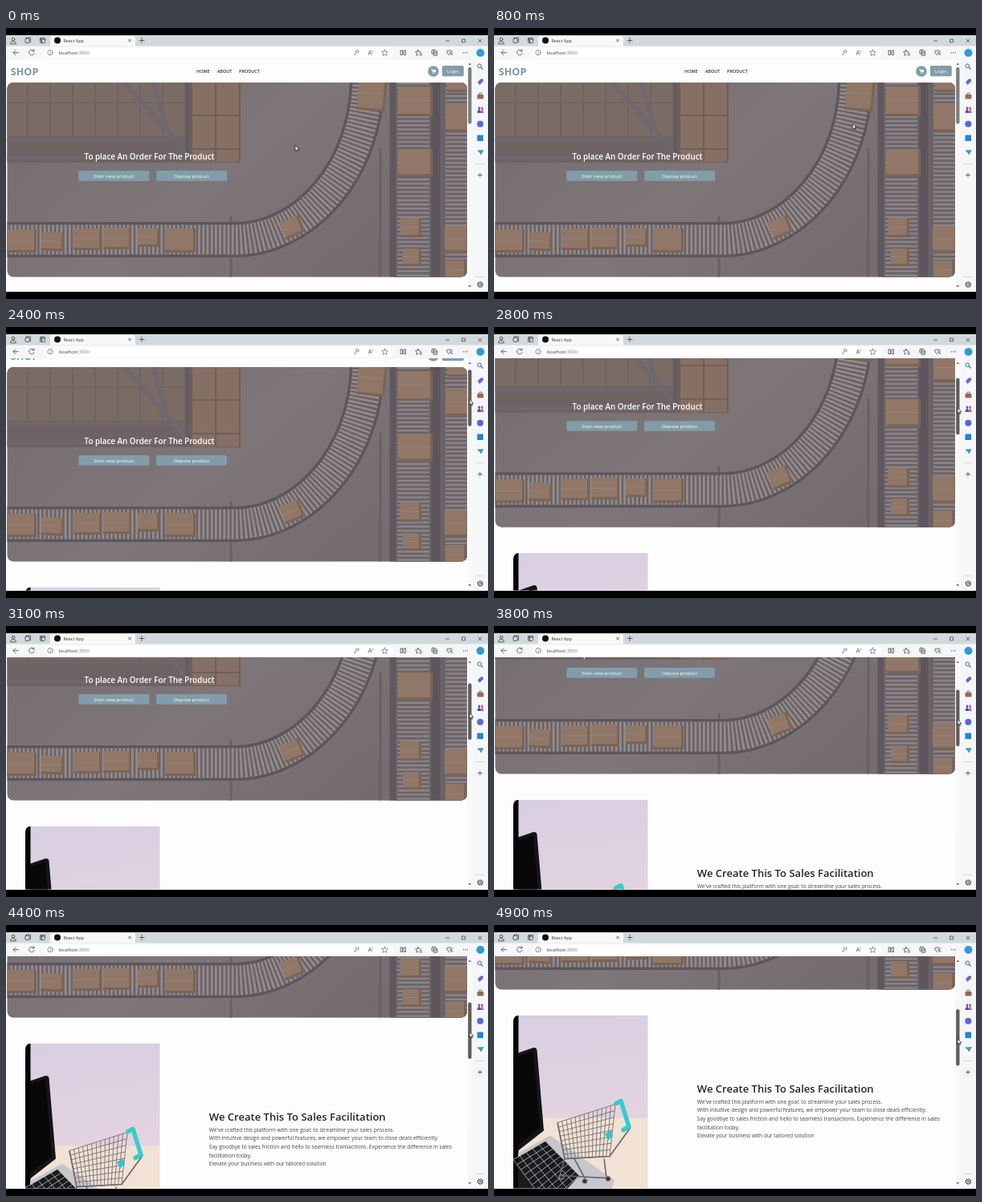
These frames come from a looping animation (600 by 338 pixels, 5 s). An HTML page:

```html
<!DOCTYPE html>
<html lang="en">
<head>
<meta charset="utf-8">
<title>React App</title>
<style>
  html, body { margin: 0; width: 100%; height: 100%; overflow: hidden; background: #000; }
  svg { display: block; width: 100vw; height: 100vh; }
  text { font-family: "Open Sans", "Noto Sans", sans-serif; }
  .semi { font-weight: 600; }
  .mid { text-anchor: middle; }
  .btn { font-size: 5.9px; fill: #fff; text-anchor: middle; }
  .nav { font-size: 5.5px; font-weight: 600; fill: #333; }
  .icon { fill: none; stroke: #444; stroke-width: .8; stroke-linecap: round; stroke-linejoin: round; }
</style>
</head>
<body>
<svg viewBox="0 0 600 338">
  <defs>
    <clipPath id="view"><rect y="39" width="580.5" height="289.5"/></clipPath>
    <clipPath id="heroClip"><rect x="1.5" y="68" width="572.5" height="242.5" rx="8"/></clipPath>
    <clipPath id="photoClip"><path d="M24 350V121q0-8 8-8H191.500V350z"/></clipPath>
    <linearGradient id="floor" x2="1" y2=".5">
      <stop stop-color="#706a6b"/><stop offset=".55" stop-color="#7d7777"/><stop offset="1" stop-color="#716a6c"/>
    </linearGradient>
    <linearGradient id="wall" x2=".2" y2="1">
      <stop stop-color="#d7cfe3"/><stop offset="1" stop-color="#e2d3de"/>
    </linearGradient>
  </defs>

  <!-- browser frame -->
  <rect y="9" width="600" height="320" fill="#f5f6f7"/>
  <rect y="9" width="600" height="13.500" fill="#d0d9dc"/>
  <path d="M55 22.500V13q0-3 3-3H158q3 0 3 3V22.500z" fill="#f8f8f8"/>
  <rect x="48" y="24.500" width="434" height="13" rx="6.500" fill="#fff"/>
  <circle cx="64" cy="15.500" r="4" fill="#111"/>
  <text x="71.500" y="17.700" font-size="5.400" fill="#333">React App</text>
  <text x="65.500" y="33" font-size="5.700" fill="#333">localhost<tspan fill="#777">:3000</tspan></text>
  <g class="icon">
    <circle cx="9" cy="14" r="1.800"/><path d="M5.500 19.500q0-3 3.500-3t3.500 3z"/>
    <rect x="24" y="13" width="5" height="5.500" rx="1"/><path d="M25.500 13v-1h5v5.500h-1"/>
    <rect x="42.500" y="12.500" width="6" height="6" rx="1"/><path d="M42.500 14h6M44.300 14v4.500" stroke-width="1.200"/>
    <path d="M152.500 14l3 3m0-3l-3 3M166 15.500h6M169 12.500v6"/>
    <path d="M547.500 16h4M568 14h3.500v3.800H568zM588 14l4 4m0-4l-4 4"/>
    <path d="M15.500 30.700h-6.500m3-3l-3 3 3 3M34.500 28.500a3.300 3.300 0 1 0 .6 3M35 27v2h-2"/>
    <g stroke="#777">
      <circle cx="55" cy="30.700" r="3.200"/><path d="M55 30.500v2M55 29v.1"/>
      <circle cx="437.300" cy="29.300" r="1.700"/><path d="M436 30.500l-2.500 2.800h1.800"/>
      <path d="M451 33.500l2-5.500 2 5.500M451.800 31.500h2.500M456 28q1 1.200 0 2.400"/>
      <path d="M471.500 27l1.100 2.500 2.700.3-2 1.900.6 2.700-2.400-1.400-2.400 1.400.6-2.700-2-1.900 2.700-.3z"/>
    </g>
    <path d="M491.500 28h2v5.500h-2zM495.500 28h2v5.500h-2z"/>
    <path d="M513 27.500l1 2.200 2.300.3M513 27.500l-1 2.200-2.300.3 1.700 1.700-.4 2.500 2-1.200M515 32h2.500M515 34h2.500"/>
    <rect x="530" y="27.500" width="5" height="5" rx="1"/><path d="M532 34.300h4.500V29M532.500 28.800v2.500m-1.200-1.200h2.500"/>
    <path d="M552 34l-3-3q-1-3 1.500-3.200l1.500 1.200 1.500-1.200q2.500.2 1.500 3.200M552 31h2v2h2"/>
    <path d="M569.300 30.800h.1M571.800 30.800h.1M574.300 30.800h.1" stroke-width="1.300"/>
  </g>

  <!-- side bar -->
  <circle cx="590.500" cy="31" r="5" fill="#2f9bd6"/>
  <circle cx="589.300" cy="47.300" r="2.400" fill="#d6ebff" stroke="#44659a" stroke-width=".9"/>
  <path d="M591.200 49.200l2.400 2.500" stroke="#44659a" stroke-width="1.200"/>
  <path d="M587 67.500l4-4h3v3l-4.500 4.500z" fill="#6b63d6"/>
  <path d="M589 83v-1.800h3V83" fill="none" stroke="#6d4c41" stroke-width=".8"/>
  <rect x="586.500" y="83" width="8" height="5.500" rx="1" fill="#96695a"/>
  <path d="M586.500 106q0-3 2-4l-1-2 1.500-2 1.500 2-1 2q2 1 2 4z" fill="#5b4bb0"/>
  <path d="M591 106l1-4-1-2 1.500-2 1.700 2-1 2 1.500 4z" fill="#b455a8"/>
  <circle cx="590.300" cy="119.800" r="4" fill="#5a67d8"/>
  <rect x="586.500" y="133.500" width="7.500" height="7.500" fill="#1f86d8"/>
  <path d="M586.300 152.500l8.500-.5-3.500 6.500-1.800-2.700z" fill="#3d9cc0"/>
  <path d="M584 169.500h12M584 310.500h12" stroke="#ccc" stroke-width=".7"/>
  <g class="icon">
    <path d="M587.500 183.500h5M590 181v5"/>
    <circle cx="590.300" cy="320" r="1.100"/><circle cx="590.300" cy="320" r="3" stroke-dasharray="2.200 .94" stroke-width="1.200"/>
  </g>

  <g clip-path="url(#view)">
    <rect y="39" width="580.500" height="290" fill="#fdfdfd"/>
    <g id="page">
      <text x="5.800" y="58.800" font-size="12.600" font-weight="700" fill="#7c97a2">SHOP</text>
      <text class="nav" x="237" y="56">HOME</text>
      <text class="nav" x="262.700" y="56">ABOUT</text>
      <text class="nav" x="290" y="56">PRODUCT</text>
      <circle cx="532" cy="54" r="6.800" fill="#829da9"/>
      <path d="M529 51.500h1.200l1 3.500h3l.7-2.500h-4" fill="#fff" stroke="#fff" stroke-width=".7"/>
      <path d="M531.500 56.700h.1M534 56.700h.1" stroke="#fff" stroke-linecap="round"/>
      <rect x="543" y="47" width="26.800" height="13.300" rx="2" fill="#829da9"/>
      <text class="btn" x="556.400" y="56">Login</text>

      <g clip-path="url(#heroClip)">
        <rect y="68" width="580" height="243" fill="url(#floor)"/>
        <path d="M0 68H232V168H0z" fill="#6a605d"/>
        <g id="shelf"></g>
        <g fill="none" stroke="#69666b">
          <path d="M0 139H228M0 162H232" stroke-width="4"/>
          <path d="M148 68L228 160M184 68L201 130" stroke-width="6"/>
          <path d="M226 68V165" stroke-width="5" stroke="#5d595c"/>
        </g>
        <g fill="none">
          <path d="M466 150V311M280 235V311" stroke="#625d60" stroke-width="3"/>
          <path id="bend" d="M0 264H285C370 264 450 180 450 60" stroke="#555156" stroke-width="44"/>
          <use href="#bendLine" stroke="#787274" stroke-width="39"/>
          <path id="bendLine" d="M0 264H285C370 264 450 180 450 60" stroke-width="37"/>
          <use href="#bendLine" stroke="#645f61" stroke-width="36"/>
          <use href="#bendLine" stroke="#96908f" stroke-width="33" stroke-dasharray="2.700 2.500"/>
          <path d="M506 68V311M562 68V311" stroke="#585459" stroke-width="57"/>
          <path d="M473 68V311M540 68V311" stroke="#757074" stroke-width="2"/>
          <path d="M507 68V311M562 68V311" stroke="#646064" stroke-width="44"/>
          <path d="M507 68V311M567 68V311" stroke="#8d8786" stroke-width="40" stroke-dasharray="2.600 2.600"/>
          <path d="M536 68V311" stroke="#555156" stroke-width="9"/>
        </g>
        <g id="boxes"></g>
        <rect y="68" width="580" height="243" fill="#80737b" opacity=".16"/>
      </g>
      <text class="semi" x="97.500" y="163.700" font-size="9.830" fill="#fff">To place An Order For The Product</text>
      <rect x="90.300" y="178" width="88" height="12.700" rx="2" fill="#829da9"/>
      <rect x="187" y="178" width="88" height="12.700" rx="2" fill="#829da9"/>
      <text class="btn" x="134.200" y="186.500">Start view product</text>
      <text class="btn" x="231" y="186.500">Depose product</text>

      <g transform="translate(0 229.500)" clip-path="url(#photoClip)">
        <path d="M24 113H192V242H24z" fill="url(#wall)"/>
        <path d="M24 241H192V350H24z" fill="#f1e2d5"/>
        <path d="M24 113H30.500V350H24z" fill="#050505"/>
        <path d="M30 285L70 263 150 319 139 350H30z" fill="#c7c6cc"/>
        <path d="M30 160L49 153.500q4-.5 4.500 3L62 257 30 282z" fill="#151416"/>
        <path d="M30 164L49 158 57 254 30 275z" fill="#08080a"/>
        <path d="M30 290L64 270 106 313 82 340H30z" fill="#1b1a1d"/>
        <path id="keys" fill="none" stroke="#c1c0c7" stroke-width=".8"/>
        <path id="wires" fill="none" stroke="#77706f" stroke-width=".9"/>
        <path d="M79 247L88 292 144 289 170 253M150 225L156 219M88 292L82 313 140 316 137 292M100 292L114 318" fill="none" stroke="#6d6868" stroke-width="1.700"/>
        <g fill="#39363a" stroke="#a9a5a6"><circle cx="84" cy="315" r="3"/><circle cx="113" cy="320" r="3.200"/><circle cx="142" cy="317" r="3.200"/></g>
        <path d="M152 223l6-3 10 32-7 4" fill="none" stroke="#35cdcb" stroke-width="5.500" stroke-linecap="round" stroke-linejoin="round"/>
        <path d="M138 261l8-4 2 7-6 5z" fill="#35c3bf"/>
      </g>

      <text class="semi" x="252.800" y="439" font-size="13.060" fill="#222529">We Create This To Sales Facilitation</text>
      <g id="copy" font-size="6.620" fill="#444"></g>
    </g>
    <rect x="574.500" y="39" width="6" height="290" fill="#f8f8f8"/>
    <path d="M575.300 46l2-2.500 2 2.500zM575.300 321l2 2.500 2-2.500z" fill="#777"/>
    <rect id="thumb" x="575.200" y="49" width="4.300" height="70.500" rx="2"/>
  </g>
  <path id="cursor" d="M0 0V6.700L1.600 5.300 2.700 7.700 3.800 7.200 2.800 4.900H4.900z" fill="#fff" stroke="#111" stroke-width=".7"/>
</svg>
<script>
const $ = id => document.getElementById(id);

// wire mesh across the quad a-b-c-d (clockwise)
function mesh(a, b, c, d, cols, rows) {
  const mix = (p, q, k) => p.map((v, i) => v + (q[i] - v) * k);
  const line = (p, q) => `M${p}L${q}`;
  let path = "";
  for (let i = 0; i <= cols; i++) path += line(mix(a, b, i / cols), mix(d, c, i / cols));
  for (let i = 0; i <= rows; i++) path += line(mix(a, d, i / rows), mix(b, c, i / rows));
  return path;
}
$("wires").setAttribute("d", mesh([79, 247], [151, 224], [144, 289], [88, 292], 13, 8));
$("keys").setAttribute("d", mesh([24, 293], [64, 270], [106, 313], [66, 350], 5, 9));

// cartons: x, y, width, height, turn
const carton = ([x, y, w, h, turn = 0]) => `<g transform="rotate(${turn} ${x + w / 2} ${y + h / 2})">
  <rect x="${x}" y="${y}" width="${w}" height="${h}" fill="#937864"/>
  <path d="M${x} ${y + h}v-3h${w - 3}V${y}h3v${h}z" fill="#79624f"/>
  <path d="M${x} ${y + h * .48}h${w - 3}" stroke="#a48a75" stroke-width=".8"/></g>`;
$("boxes").innerHTML = [
  [0, 251, 38, 29], [44, 255, 28, 23, 3], [84, 250, 35, 27], [121, 249, 35, 27],
  [164, 250, 27, 23], [198, 250, 38, 30], [343, 237, 26, 23, -22], [438, 62, 35, 41, 5],
  [488, 73, 43, 37], [488, 151, 43, 34], [491, 237, 26, 24], [494, 275, 23, 22],
  [547, 95, 30, 34], [546, 247, 30, 33], [547, 290, 26, 25], [549, 58, 28, 22]
].map(carton).join("");

let shelf = "";
for (let i = 0; i < 8; i++) {
  shelf += `<rect x="${i * 28}" y="68" width="26" height="67" fill="#7a6a60"/>
    <path d="M${i * 28} 93h26" stroke="#6a5c55"/>`;
}
for (let i = 0; i < 6; i++) {
  const x = 232 + i % 2 * 30, y = 68 + (i >> 1) * 42;
  shelf += `<rect x="${x}" y="${y}" width="28" height="${i > 3 ? 15 : 40}" fill="#876f5f"/>`;
}
$("shelf").innerHTML = `<path d="M230 68h62v100h-62z" fill="#6d5b51"/>` + shelf;

$("copy").innerHTML = [
  "We've crafted this platform with one goal: to streamline your sales process.",
  "With intuitive design and powerful features, we empower your team to close deals efficiently.",
  "Say goodbye to sales friction and hello to seamless transactions. Experience the difference in sales",
  "facilitation today.",
  "Elevate your business with our tailored solution"
].map((s, i) => `<text x="252.800" y="${452.700 + i * 10.650}">${s}</text>`).join("");

// [time, value...] keys, linear between them
function track(keys, t) {
  const n = keys.findIndex(k => k[0] > t);
  if (n < 0) return keys.at(-1).slice(1);
  if (n === 0) return keys[0].slice(1);
  const a = keys[n - 1], b = keys[n], k = (t - a[0]) / (b[0] - a[0]);
  return a.slice(1).map((v, i) => v + (b[i + 1] - v) * k);
}
const scrollKeys = [[2100, 0], [2400, 18], [3100, 93], [3800, 126], [4400, 195], [4900, 230]];
const pointerKeys = [[300, 360, 146.500], [1500, 567, 81], [1900, 577, 86]];

function draw(now) {
  const t = Math.floor(now % 5000 / 100) * 100;
  const [scroll] = track(scrollKeys, t);
  const [x, y] = track(pointerKeys, t);
  const drag = scroll * .243;
  $("page").setAttribute("transform", `translate(0 ${-scroll})`);
  $("thumb").setAttribute("transform", `translate(0 ${drag})`);
  $("thumb").setAttribute("fill", t < 2000 ? "#7d7d7d" : "#5c5c5c");
  $("cursor").setAttribute("transform", `translate(${x} ${y + drag})`);
  requestAnimationFrame(draw);
}
requestAnimationFrame(draw);
</script>
</body>
</html>
```
